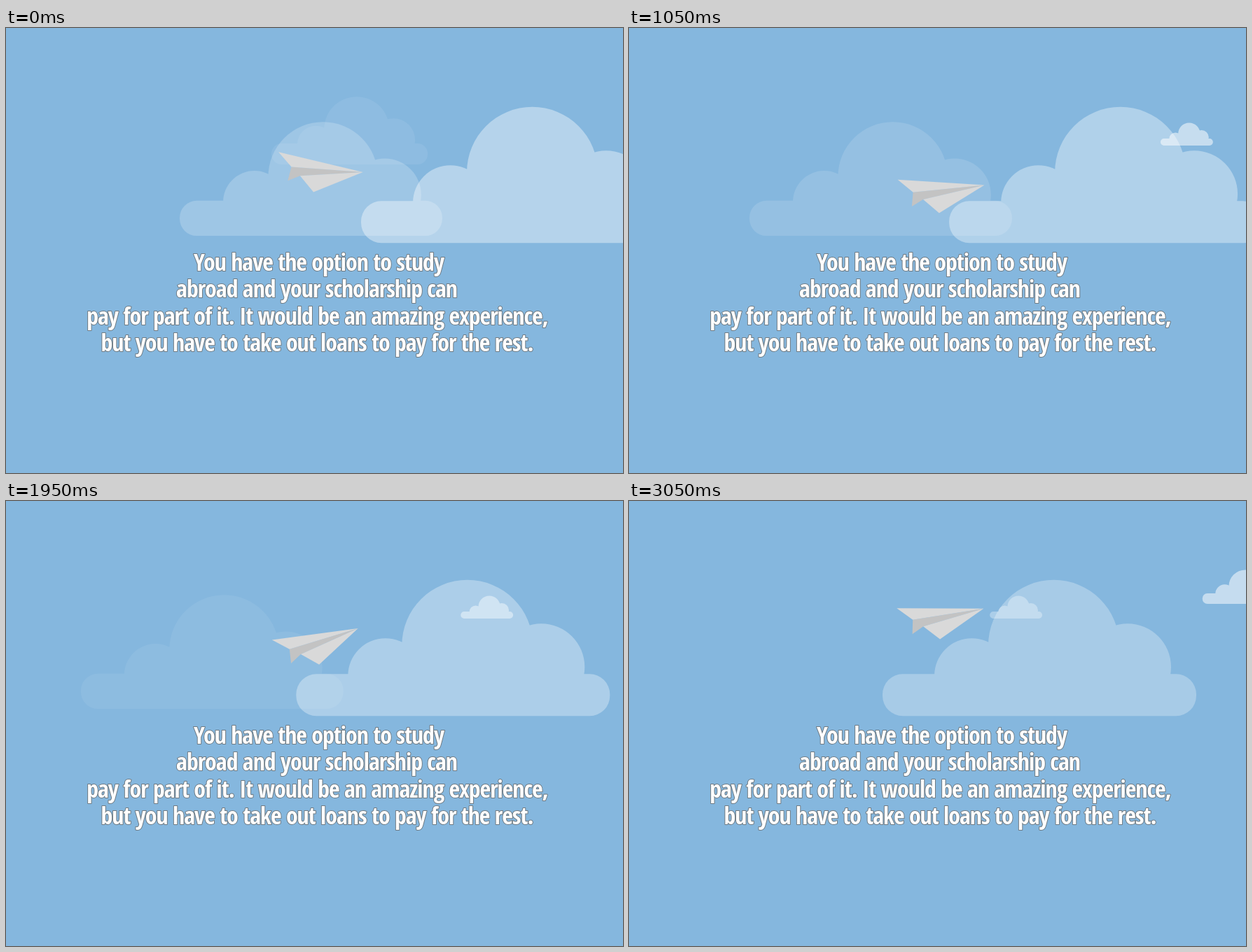
Recreate the animation shown at these times as an HTML page with a canvas. Size 881 by 636 pixels, loop 3100 ms.

```html
<!DOCTYPE html>
<html lang="en">
<head>
<meta charset="utf-8">
<title>Paper plane</title>
<style>
  html, body { margin: 0; width: 100%; height: 100%; overflow: hidden; background: #85b7de; }
  canvas, svg { position: absolute; left: 0; top: 0; display: block; }
  text {
    font-weight: 800;
    font-stretch: extra-condensed;
    letter-spacing: -0.03em;
    text-anchor: middle;
    fill: #fff;
    stroke: #6f7a82;
    stroke-width: 2px;
    stroke-linejoin: round;
    paint-order: stroke fill;
  }
</style>
</head>
<body>
<canvas id="sky" width="881" height="636"></canvas>
<svg id="caption" width="881" height="636" viewBox="0 0 881 636">
  <text x="446.5">You have the option to study</text>
  <text x="443.5">abroad and your scholarship can</text>
  <text x="444.5">pay for part of it. It would be an amazing experience,</text>
  <text x="444">but you have to take out loans to pay for the rest.</text>
</svg>
<script>
const W = 881, H = 636, LOOP = 3100;
const ctx = document.getElementById('sky').getContext('2d');

// Caption: narrowest available face, sized so the longest line keeps its measure
const caption = document.getElementById('caption');
const lines = [...caption.querySelectorAll('text')];
const faces = ['Noto Sans', 'Open Sans', 'Roboto', 'Roboto Condensed', 'Open Sans Condensed', 'Liberation Sans Narrow'];

function setCaption() {
  const measure = face => {
    caption.style.fontFamily = `"${face}", sans-serif`;
    return lines[2].getComputedTextLength();
  };
  caption.style.fontSize = '100px';
  const widths = faces.map(measure);
  const width = Math.min(...widths);
  const size = Math.min(36, 100 * 659 / width);
  caption.style.fontFamily = `"${faces[widths.indexOf(width)]}", sans-serif`;
  caption.style.fontSize = size + 'px';
  lines.forEach((line, i) => line.setAttribute('y', 334.5 + 0.36 * size + 38.4 * i));
}

// Animation steps: each beat is split into equal ticks
const beats = [0, 40, 570, 1100, 1650, 2210, 2750, LOOP];
const ticks = [1, 11, 11, 11, 11, 11, 7];

function snap(t) {
  let i = 0;
  while (t >= beats[i + 1]) i++;
  const step = (beats[i + 1] - beats[i]) / ticks[i];
  const at = k => Math.floor((beats[i] + k * step) / 10) * 10;
  let k = Math.floor((t - beats[i]) / step);
  if (k + 1 < ticks[i] && t >= at(k + 1)) k++;
  return at(k);
}

// Cubic curve through [time, value] points; flat = ease to rest at each point
function curve(pts, t, flat) {
  const n = pts.length - 1;
  if (t >= pts[n][0]) return pts[n][1];
  let i = 0;
  while (t >= pts[i + 1][0]) i++;
  const slope = j => {
    if (flat) return 0;
    const a = pts[Math.max(j - 1, 0)], b = pts[Math.min(j + 1, n)];
    return (b[1] - a[1]) / (b[0] - a[0]);
  };
  const [t0, v0] = pts[i], [t1, v1] = pts[i + 1];
  const d = t1 - t0, u = (t - t0) / d, w = 1 - u;
  return w * w * (1 + 2 * u) * v0 + u * u * (3 - 2 * u) * v1
    + d * u * w * (w * slope(i) - u * slope(i + 1));
}

// Unit cloud: 448 wide, base line at y = 0
const cloud = new Path2D();
cloud.roundRect(0, -60, 448, 60, 29);
for (const [x, y, r] of [[127.5, -57.5, 53.5], [244.5, -101, 93.5], [350, -70, 62]]) {
  cloud.moveTo(x + r, y);
  cloud.arc(x, y, r, 0, Math.PI * 2);
}

// x and alpha at time 0, with their change per ms
const clouds = [
  { x: 379, vx: -0.081, base: 195, scale: 0.498, alpha: 0.075, va: -0.00008 },
  { x: 248, vx: -0.0724, base: 297, scale: 0.837, alpha: 0.2, va: -0.000069 },
  { x: 507, vx: -0.04754, base: 307.3, scale: 1, alpha: 0.39, va: -0.000036 },
  { x: 887, vx: -0.1219, base: 168, scale: 0.167, alpha: 0.65, va: -0.00011 },
  { x: 1139, vx: -0.105, base: 147, scale: 0.25, alpha: 0.83, va: -0.0001 }
];

function drawCloud(c, t) {
  const alpha = c.alpha + c.va * t;
  if (alpha <= 0) return;
  ctx.save();
  ctx.translate(c.x + c.vx * t, c.base);
  ctx.scale(c.scale, c.scale);
  ctx.fillStyle = `rgba(255, 255, 255, ${alpha})`;
  ctx.fill(cloud);
  ctx.restore();
}

const height = [[0, 213], [770, 241.3], [980, 243.5], [1300, 236.2], [1700, 220.6], [2210, 203], [2650, 186], [3050, 175.5]];
const tilt = [[0, 13.5], [450, 15.2], [720, 15.2], [1420, -10.3], [1560, -10.3], [2750, 0.3]];

function poly(color, ...pts) {
  ctx.fillStyle = color;
  ctx.beginPath();
  pts.forEach(p => ctx.lineTo(...p));
  ctx.fill();
}

function drawPlane(t) {
  const nose = [62, -22];
  ctx.save();
  ctx.translate(444.2, curve(height, t));
  ctx.rotate(curve(tilt, t, true) * Math.PI / 180);
  poly('#c3c3c3', [-39, -5.5], nose, [-24, 4], [-39.5, 15]);
  poly('#d9d9d9', [-62, -22], nose, [-39, -5.5]);
  poly('#d9d9d9', [-24, 4], nose, [0, 22]);
  ctx.restore();
}

function draw(now) {
  const t = snap(Math.max(0, now) % LOOP);
  ctx.fillStyle = '#85b7de';
  ctx.fillRect(0, 0, W, H);
  clouds.forEach(c => drawCloud(c, t));
  drawPlane(t);
}

setCaption();
draw(0);
const start = performance.now();
requestAnimationFrame(function tick(now) {
  draw(now - start);
  requestAnimationFrame(tick);
});
</script>
</body>
</html>
```
